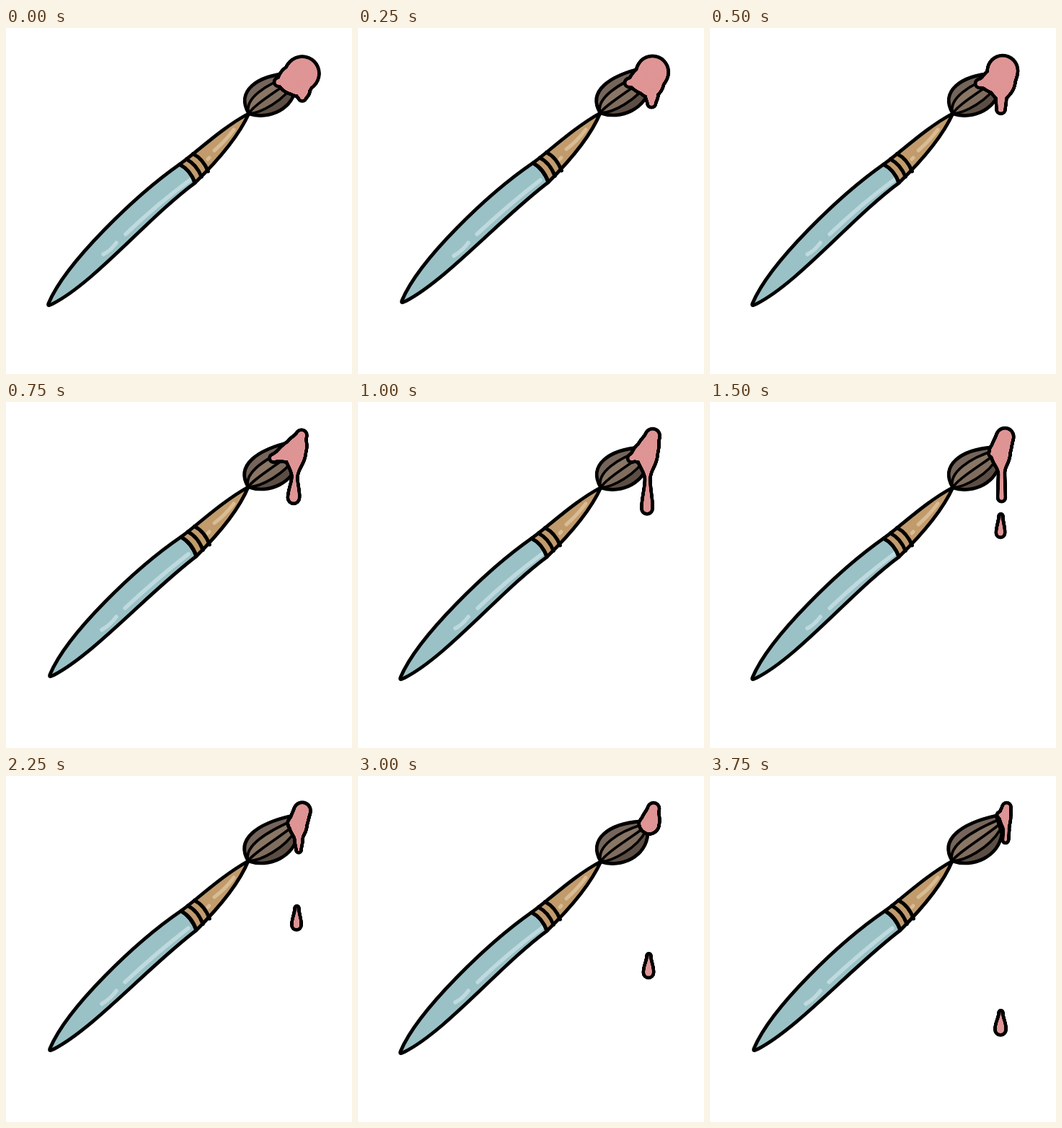
Write an HTML page with a canvas that moves like this. It is 480x480 px and loops after 4.25 s.

```html
<!DOCTYPE html>
<html lang="en">
<head>
<meta charset="utf-8">
<title>Dripping paintbrush</title>
<style>
  html, body { margin: 0; width: 100%; height: 100%; overflow: hidden; background: #fff; }
  canvas { display: block; width: 100%; height: 100%; }
</style>
</head>
<body>
<canvas id="stage" width="480" height="480"></canvas>
<script>
const ctx = document.getElementById('stage').getContext('2d');
const INK = '#000', PINK = '#df9595', BLUE = '#9ac1c6', TAN = '#c19b6c';
const HAIR = ['#75655a', '#8a7665', '#806d5e', '#5c4e44'];
const EDGE = 4.8;

const lerp = (a, b, t) => a + (b - a) * t;
const mix = (a, b, t) => a.map((v, i) => lerp(v, b[i], t));

function line(d, color, width) {
  ctx.strokeStyle = color;
  ctx.lineWidth = width;
  ctx.stroke(new Path2D(d));
}

function shape(d, fill) {
  ctx.fillStyle = fill;
  ctx.fill(new Path2D(d));
  line(d, INK, EDGE);
}

// The hair is a fan of curves blended between its upper and lower edge.
function drawHair(w) {
  const base = [337 - w, 119 - w];
  const upper = [...base, 318, 88, 348, 66, 392 + 5 * w, 63 - 8 * w];
  const lower = [...base, 365, 128, 400, 112, 402 + 3 * w, 80];
  const strand = k => {
    const [x, y, ...rest] = mix(upper, lower, k);
    return `M${x} ${y}C${rest}`;
  };
  const [ax, ay, bx, by, cx, cy, dx, dy] = lower;
  const back = `L${dx} ${dy}C${cx} ${cy} ${bx} ${by} ${ax} ${ay}Z`;
  HAIR.forEach((color, i) => {
    ctx.fillStyle = color;
    ctx.fill(new Path2D(strand(i / HAIR.length) + back));
  });
  HAIR.forEach((_, i) => line(strand(i / HAIR.length), INK, 3.6));
  line(strand(0) + back, INK, EDGE);
}

// w is the hand-drawn wobble, 0 or 1.
function drawBrush(w) {
  const x = 2 * w, y = -4 * w;
  const top = `${241 + x} ${189 - x}`, low = `${262 + x} ${215 - w}`;
  const neck = `${337 - w} ${118.5 - w / 2}`;

  shape(`M${59 + x} ${382 + y}C${83 + x} ${325 + y} 180 ${232 - x} ${top}
    Q${256 + x} 197 ${low}C198 ${262 + x} 122 ${354 + y} ${64 + x} ${383 + y}
    Q${57 + x} ${387 + y} ${59 + x} ${382 + y}Z`, BLUE);
  line(`M${166 - w} 286Q209 245 ${255 - x} 211M${135 - x} ${314 + x}Q145 309 153 298`, '#bfdade', 5.5);

  shape(`M${top}C265 ${172 - w} 300 138 ${neck}C325 145 300 178 ${low}Q${256 + x} 197 ${top}Z`, TAN);
  for (let i = 0; i < 3; i++) {
    const bx = 241 + x + i * 9.2, by = 189.5 - x - i * 7.5;
    line(`M${bx} ${by}q14 7 21 ${24.5 + w}`, INK, 5);
  }
  line(`M289 ${170 - x}Q304 157 316 141M280 182l2 -2`, '#d9bc94', 5);
  drawHair(w);
}

// Sweeps a disc [x, y, r] from one key to the next, padded by the outline.
function sweep(keys, pad) {
  for (let i = 0; i < keys.length - 1; i++) {
    const [a, b] = [keys[i], keys[i + 1]];
    const n = Math.ceil(Math.hypot(b[0] - a[0], b[1] - a[1]) * 2) + 1;
    for (let j = 0; j <= n; j++) {
      const t = j / n;
      ctx.beginPath();
      ctx.arc(lerp(a[0], b[0], t), lerp(a[1], b[1], t),
        lerp(a[2], b[2], t * t * (3 - 2 * t)) + pad, 0, 7);
      ctx.fill();
    }
  }
}

function paint(...chains) {
  ctx.fillStyle = INK;
  chains.forEach(c => sweep(c, EDGE));
  ctx.fillStyle = PINK;
  chains.forEach(c => sweep(c, 0));
}

// Each blob: side lobe, body, head, neck and drip end, keyed by step.
const blobs = {
  0: [[378, 75, 3.5], [404, 71, 19], [411, 63, 21], [411, 86, 8], [411, 96, 3]],
  2: [[374, 77, 3.5], [404, 72, 17], [406, 59, 18.5], [404, 99, 4.5], [403.5, 113, 3.5]],
  3: [[371, 78, 3], [401, 67, 12.5], [410, 46, 5], [400.5, 104, 1.5], [399, 133, 5.5]],
  5: [[388, 78, 3], [400.5, 70, 12.5], [407.5, 48, 10], [403, 110, .8], [403, 163, 4.5]],
  7: [[395, 65, 2], [405, 66, 10], [411, 48, 9], [406, 88, 3], [406, 103, 1]],
  8: [[395, 66, 3], [404.5, 67, 10.5], [410, 45, 5.5], [404, 68, 9.5], [404, 69, 9]],
  9: [[402, 54, 1.5], [409, 55, 5.5], [411.5, 43, 3.5], [411, 75, 1.5], [410, 89, 1.5]]
};
const fall = { 6: 182, 7: 207, 8: 273, 9: 352 };

// Steps without a key lie halfway between their neighbours.
const blobAt = i => blobs[i] || blobs[i - 1].map((disc, k) => mix(disc, blobs[i + 1][k], .5));

function draw(i) {
  ctx.fillStyle = '#fff';
  ctx.fillRect(0, 0, 480, 480);
  drawBrush(i % 2);
  const [lobe, body, head, neck, end] = blobAt(i);
  paint([lobe, body], [head, body, neck, end]);
  const y = fall[i];
  if (y) paint([[403.5, y - 24, .3], [403, y, 4 + (i - 7) * .5]]);
}

// Six quick steps, three slow ones and a shorter last one.
const total = 4250;
const stepAt = t => t < 1500 ? Math.floor(t / 250) : 6 + Math.floor((t - 1500) / 750);

ctx.lineCap = ctx.lineJoin = 'round';
const start = performance.now();
let shown = -1;

function tick() {
  const i = stepAt((performance.now() - start) % total);
  if (i !== shown) draw(shown = i);
  requestAnimationFrame(tick);
}
tick();
</script>
</body>
</html>
```
